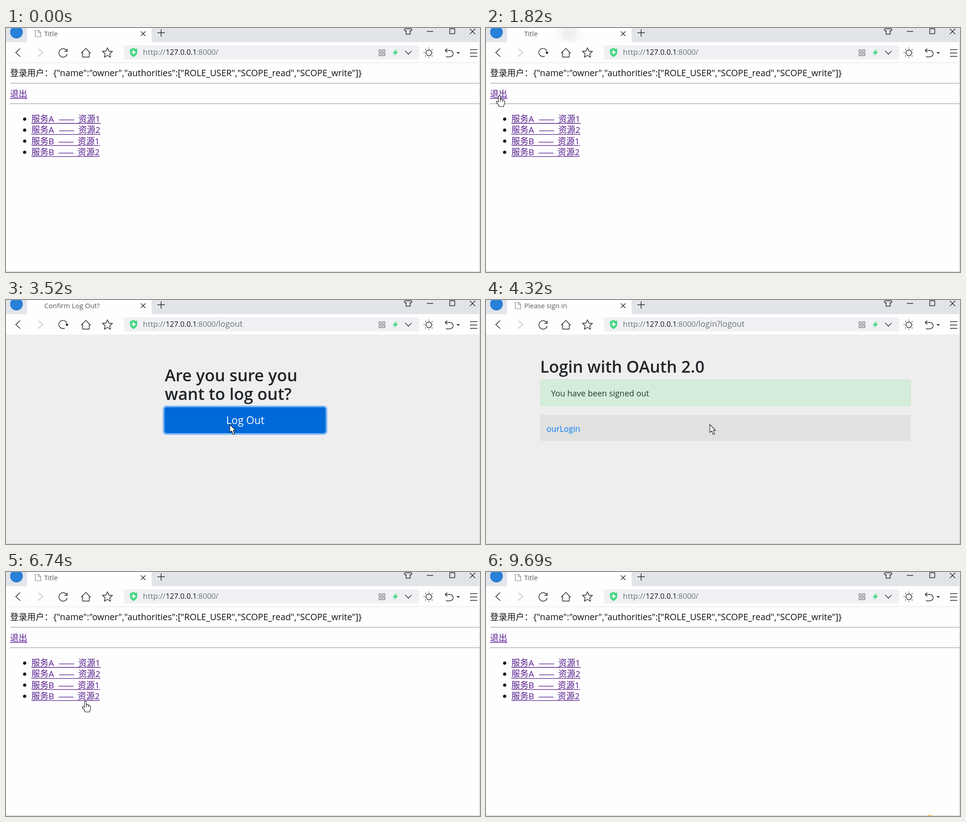
Write an HTML page that moves like this. It is 1042 px wide and 537 px high and loops after 9820 ms.

```html
<!DOCTYPE html>
<html lang="zh">
<head>
<meta charset="utf-8">
<title>Logout flow</title>
<style>
  html, body { margin: 0; width: 100%; height: 100%; overflow: hidden; background: #fff; }
  svg { display: block; width: 100vw; height: 100vh; font: 18.8px "Open Sans", "Noto Sans CJK SC", "Noto Sans CJK", sans-serif; }
  text { white-space: pre; }
  .line { fill: none; stroke: #222; stroke-width: 1.4; }
  .visited { fill: #551a8b; }
  .rule { stroke: #551a8b; stroke-width: 1.3; }
  .dash { font: 20.8px "Noto Sans CJK SC", "Noto Sans CJK", sans-serif; text-anchor: middle; }
  .heading { font-size: 36px; font-weight: 600; fill: #212529; }
</style>
</head>
<body>
<svg viewBox="0 0 1042 537" preserveAspectRatio="none">
  <defs>
    <radialGradient id="halo">
      <stop offset="0" stop-color="#eee"/><stop offset=".48" stop-color="#f0f0f0"/>
      <stop offset=".52" stop-color="#f6f6f6"/><stop offset="1" stop-color="#fcfcfc"/>
    </radialGradient>
    <clipPath id="tab"><path d="M46 0H320V31H46Z"/></clipPath>
  </defs>
  <rect width="1042" height="537" fill="#fefefe"/>

  <!-- tab strip -->
  <rect width="1042" height="31" fill="#e1e5ea"/>
  <rect x="46" width="274" height="31" fill="#fefefe"/>
  <circle cx="23" cy="9" r="14" fill="#2b80d8"/>
  <circle id="pulse" cx="183" cy="12" r="31" fill="url(#halo)" clip-path="url(#tab)"/>
  <path id="favicon" class="line" style="stroke:#888;stroke-width:1.2" d="M64.5 5.5H72L76.5 10V19.5H64.5ZM71.5 5.5V10.5H76.5"/>
  <text id="title" x="84" y="18" font-size="15" fill="#5a5a5a"></text>
  <g class="line">
    <path d="M296.5 7.5L306.5 17.5M306.5 7.5L296.5 17.5M333 10.5H349M341 3V19"/>
    <path d="M925 7.5H939M975.5 1.5H986.5V12.5H975.5ZM1019.5 1.5L1031.5 13.5M1031.5 1.5L1019.5 13.5"/>
    <path d="M879.5 0L875.5 3.5L878 6.5L879.5 5.5V13.5H888.5V5.5L890 6.5L892.5 3.5L888.5 0Q884 4 879.5 0"/>
  </g>

  <!-- toolbar -->
  <g class="line">
    <path d="M31 45L21.5 54L31 63"/>
    <path d="M71 45L80.5 54L71 63" stroke="#b5b5b5"/>
    <path id="reload" d="M134 51A9.3 9.3 0 1 0 134.6 57M134.5 45.5V51.5H128.5"/>
    <g id="busy">
      <path d="M131.5 47.5A9 9 0 1 0 129 62M131.5 47.5Q134 50 134 54"/>
      <path d="M130 53H138L134 58Z" fill="#222" stroke="none"/>
    </g>
    <path d="M165 55.5L175.500 45L186 55.5M168.5 52.5V64H183V52.5"/>
    <path id="star"/>
  </g>
  <rect x="259" y="38" width="649" height="31" rx="2" fill="#eff1f4"/>
  <path d="M280.5 44Q284 46 288.5 46V54Q288 60 280.5 64Q273 60 272.5 54V46Q277 46 280.5 44" fill="#48d585"/>
  <path d="M276 53.5H285M280.5 49V58" stroke="#fff" stroke-width="2.4"/>
  <text y="59" fill="#6f7274"><tspan x="301" font-size="17">http://</tspan><tspan x="351" font-size="16.2" fill="#111">127.0.0.1</tspan><tspan x="419" font-size="16.4">:8000/</tspan><tspan id="path" x="467" font-size="17.9"></tspan></text>
  <path d="M820 48H825V53H820ZM828 48H833V53H828ZM820 56H825V61H820ZM828 56H833V61H828Z" fill="none" stroke="#777" stroke-width="1.3"/>
  <path d="M858.5 46L850 56H855L853 62L862 52H857Z" fill="#48d585"/>
  <g class="line">
    <path d="M877.5 50.5L884.5 57.5L891.5 50.5"/>
    <circle cx="929.5" cy="54.5" r="6.3"/>
    <circle cx="929.5" cy="54.5" r="10.2" stroke-width="2.2" stroke-dasharray="1.3 6.711" stroke-dashoffset=".65"/>
    <path d="M970 45L965.5 49.5L970 54M966 49.5H976Q983 50 983 56.5T975 63.5H967"/>
    <path d="M1020 47.5H1036M1020 55H1036M1020 62.5H1036"/>
  </g>
  <path d="M990.5 53H997.5L994 57Z" fill="#222"/>

  <!-- home -->
  <g id="home">
    <path d="M0 76.5H1042" stroke="#e2e2e2"/>
    <text x="9" y="106" fill="#111">登录用户：</text>
    <text x="104" y="106" font-size="19.4" fill="#111">{"name":"owner","authorities":["ROLE_USER","SCOPE_read","SCOPE_write"]}</text>
    <path d="M9 121.5H1042M9 166.5H1042" stroke="#9c9c9c"/>
    <path d="M9 122.5H1042M9 167.5H1042" stroke="#eee"/>
    <text class="visited" x="9" y="152">退出</text>
    <path class="rule" d="M9 155H47"/>
    <g id="list"></g>
  </g>

  <!-- logout confirmation -->
  <g id="confirm">
    <rect y="76" width="1042" height="461" fill="#eee"/>
    <g class="heading"><text x="349" y="179">Are you sure you</text><text x="349" y="220">want to log out?</text></g>
    <rect id="ring" x="346.5" y="234.2" width="358" height="60.5" rx="6" fill="none" stroke="#007bff" stroke-opacity=".5" stroke-width="3.6"/>
    <rect id="button" x="348.3" y="236" width="354.5" height="57" rx="5"/>
    <text x="526" y="273" font-size="22.9" fill="#fff" text-anchor="middle">Log Out</text>
  </g>

  <!-- sign in -->
  <g id="login">
    <rect y="76" width="1042" height="461" fill="#eee"/>
    <text class="heading" x="119" y="160">Login with OAuth 2.0</text>
    <rect x="119.5" y="175.5" width="813.5" height="57.5" rx="4" fill="#d4edda" stroke="#c3e6cb"/>
    <text x="143" y="212" font-size="18" fill="#26382d">You have been signed out</text>
    <rect x="119" y="253" width="814.5" height="57" fill="#e1e1e0"/>
    <text id="client" x="133" y="290" font-size="17.8">ourLogin</text>
    <path id="clientRule" d="M133 292H206" stroke="#0056b3" stroke-width="1.3"/>
  </g>

  <path d="M1041.5 31V536.5H0" fill="none" stroke="#c6c6c6"/>
  <circle id="spot" cx="975" cy="544.5" r="10" fill="#f8bb50"/>
  <g id="pointer" fill="#fff" stroke="#111" stroke-width="1.1" stroke-linejoin="round">
    <path id="arrow" d="M0 0V17.5L4 14L7.5 22L10.5 20.5L7.3 13H12.8Z"/>
    <path id="hand" d="M-2.5 14V2Q-2.5 0 -.5 0T1.5 2V8Q5 7 6 9Q8.5 8.5 9 10.5Q11 10.5 11 13V17Q11 19 9 21V24H-1Q-2 20 -7 15Q-8 12.5 -5.5 12Q-4 12.5 -2.5 14ZM1.5 8V13M6 9V13.5"/>
  </g>
</svg>
<script>
const LOOP = 9820;
const $ = id => document.getElementById(id);
const show = (id, on) => { $(id).style.display = on ? '' : 'none'; };

// [time, x, y] of the pointer hotspot
const route = [
  [60, 975, 545], [380, 300, 258], [590, 300, 258], [1000, 34, 151], [1350, 34, 151], [1410, 30, 149],
  [1960, 30, 149], [2430, 425, 264], [2630, 480, 269], [2700, 480, 269], [2770, 486, 271],
  [2970, 486, 271], [3040, 492, 274], [4400, 492, 274], [4750, 340, 328], [5220, 175, 284],
  [7810, 175, 284], [8290, 975, 545]
];
// each page appears at `from`; a click at `click` starts the next load
const visits = [
  { page: 'home', from: 0, click: 1680, title: 'Title', path: '' },
  { page: 'confirm', from: 2100, click: 3240, title: 'Confirm Log Out?', path: 'logout' },
  { page: 'login', from: 3900, click: 6050, title: 'Please sign in', path: 'login?logout' },
  { page: 'home', from: 6450, click: Infinity, title: 'Title', path: '' }
];

$('star').setAttribute('d', 'M' + [...Array(10)].map((_, i) => {
  const r = i % 2 ? 5.2 : 11.5, a = i * Math.PI / 5;
  return `${223 + r * Math.sin(a)} ${55 - r * Math.cos(a)}`;
}).join('L') + 'Z');

$('list').innerHTML = ['A1', 'A2', 'B1', 'B2'].map(([service, n], i) => {
  const y = 207 + i * 24.3, shift = service === 'B' ? 1.6 : 0;
  return `<circle cx="41" cy="${y - 6.5}" r="3.5" fill="#111"/>
    <g class="visited"><text x="56" y="${y}">服务${service}</text>
    <text class="dash" x="${133.5 - shift}" y="${y + 1}">——</text>
    <text x="${159 - shift}" y="${y}">资源${n}</text></g>
    <path class="rule" d="M56 ${y + 3}H${208 - shift}"/>`;
}).join('');

function locate(t) {
  const i = route.findIndex(k => k[0] > t);
  if (i < 0) return route[route.length - 1].slice(1);
  if (!i) return route[0].slice(1);
  const [a, b] = [route[i - 1], route[i]], p = (t - a[0]) / (b[0] - a[0]);
  return [1, 2].map(j => a[j] + (b[j] - a[j]) * p);
}

function draw(t) {
  const visit = visits.filter(v => v.from <= t).pop();
  const { page, click } = visit, loading = t >= click;
  const [x, y] = locate(t);
  const over = (l, top, r, b) => x >= l && x <= r && y >= top && y <= b;
  const onClient = page === 'login' && over(133, 272, 206, 296);
  const onLink = onClient || page === 'home' && (over(9, 134, 47, 157) || over(56, 190, 208, 285));

  for (const id of ['home', 'confirm', 'login']) show(id, id === page);
  $('title').textContent = visit.title;
  $('path').textContent = visit.path;
  show('favicon', !loading);
  show('reload', !loading);
  show('busy', loading);
  $('pulse').style.opacity = loading ? Math.min(1, Math.max(0, 1 - (t - click) / 350) * 1.6) : 0;

  show('ring', loading);
  $('button').style.fill = over(349, 236, 703, 293) ? '#0069d9' : '#007bff';
  $('client').style.fill = onClient ? '#0056b3' : '#007bff';
  show('clientRule', onClient);

  show('spot', t >= 9690);
  show('arrow', !onLink);
  show('hand', onLink);
  $('pointer').setAttribute('transform', `translate(${x} ${y})`);
}

function tick() {
  draw((performance.now() - start) % LOOP);
  requestAnimationFrame(tick);
}
const start = performance.now();
tick();
</script>
</body>
</html>
```
